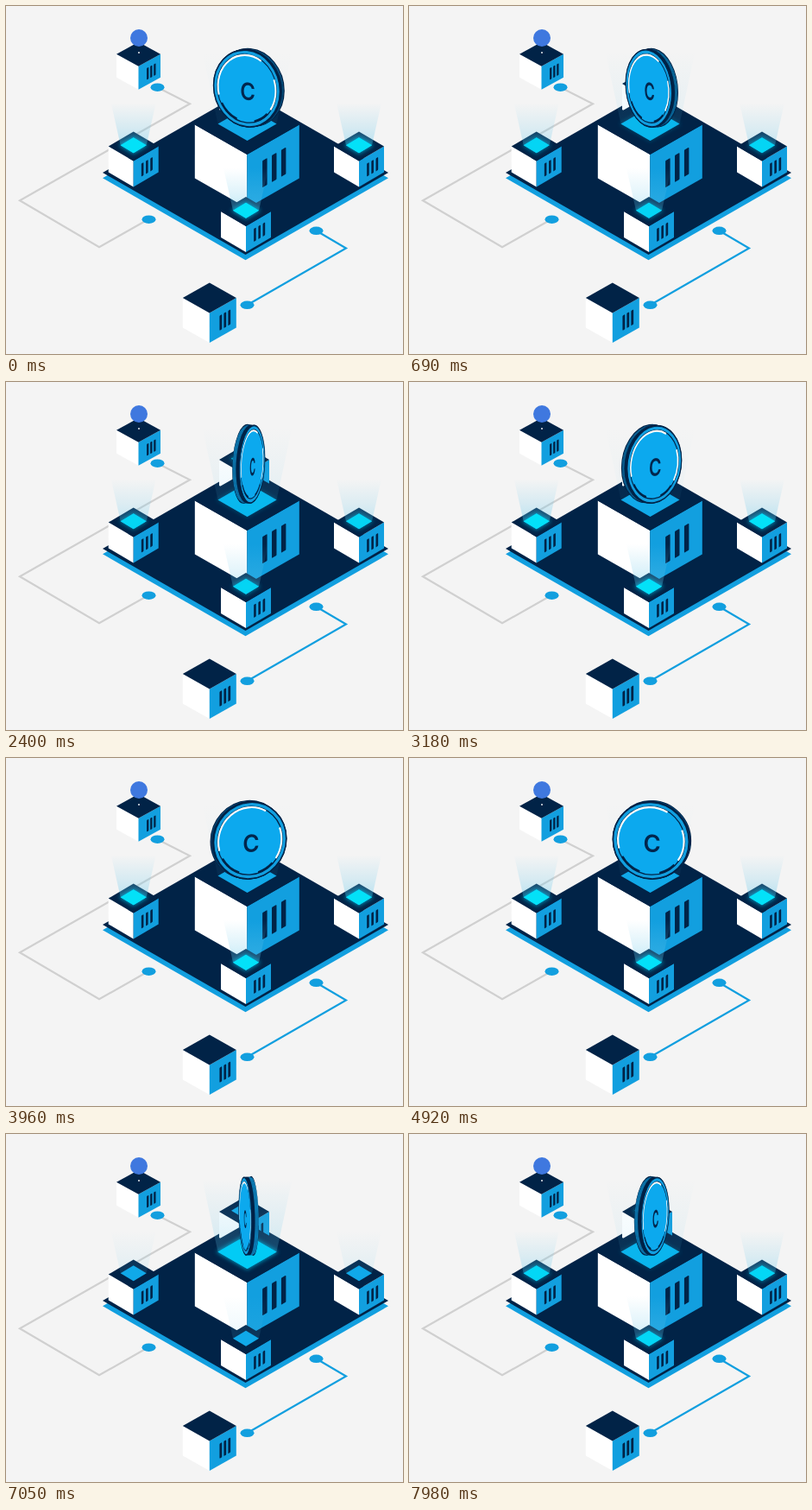
An HTML page for the animation above (8 s loop, 460x403 px).

```html
<!DOCTYPE html>
<html lang="en">
<head>
<meta charset="utf-8">
<title>Coin platform</title>
<style>
html, body { margin: 0; width: 100%; height: 100%; overflow: hidden; background: #f4f4f4; }
svg { display: block; width: 460px; height: 403px; }
text { font: 600 28px Inter, "Open Sans", sans-serif; text-anchor: middle; fill: #02264d; }
</style>
</head>
<body>
<svg id="stage" viewBox="0 0 460 403">
  <defs>
    <linearGradient id="ray" x1="0" y1="0" x2="0" y2="1">
      <stop offset="0" stop-color="#6cc8ea" stop-opacity="0"/>
      <stop offset=".5" stop-color="#6cc8ea" stop-opacity=".22"/>
      <stop offset="1" stop-color="#4fc6ee" stop-opacity=".45"/>
    </linearGradient>
    <filter id="soft" x="-50%" y="-50%" width="200%" height="200%"><feGaussianBlur stdDeviation="2.5"/></filter>
  </defs>
  <g id="scene"></g>
  <g id="coin"></g>
  <g id="front"></g>
</svg>
<script>
const NAVY = '#012347', BLUE = '#129fdf', SKY = '#0ca9ee', PALE = '#d0d0d0';
const LOOP = 8000, STEP = 30;
const START_ANGLE = 31, SPIN = 0.03257;
const PULSE = { period: 5526, from: 200, length: 2700 };
const COIN = { x: 281.2, y: 95, r: 45.2, depth: 8.5, pitch: 9 * Math.PI / 180 };

const byId = id => document.getElementById(id);
let layer = byId('scene');

function add(tag, attrs, parent = layer) {
  const node = document.createElementNS('http://www.w3.org/2000/svg', tag);
  for (const key in attrs) node.setAttribute(key, attrs[key]);
  parent.append(node);
  return node;
}
const poly = (points, fill, extra) => add('polygon', { points: points.join(' '), fill, ...extra });
const diamond = (x, y, w, h, fill, extra) =>
  poly([[x, y - h], [x + w, y], [x, y + h], [x - w, y]], fill, extra);

function route(points, color) {
  add('polyline', { points: points.join(' '), fill: 'none', stroke: color, 'stroke-width': 2.2 });
}
const dot = (cx, cy) => add('ellipse', { cx, cy, rx: 8, ry: 4.8, fill: BLUE });

// (x, y) is the centre of the top face; w and h are its half sizes
function cube(x, y, w, h, tall, firstBar = 0.34, barGap = 0.18) {
  poly([[x - w, y], [x, y + h], [x, y + h + tall], [x - w, y + tall]], '#fff');
  poly([[x + w, y], [x, y + h], [x, y + h + tall], [x + w, y + tall]], BLUE);
  diamond(x, y, w, h, NAVY);
  const side = add('g', { transform: `matrix(1 ${-h / w} 0 1 ${x} ${y + h})` });
  for (let i = 0; i < 3; i++) {
    add('rect', {
      x: w * (firstBar + i * barGap - 0.045), y: tall * 0.28,
      width: w * 0.09, height: tall * 0.5, rx: 0.8, fill: NAVY
    }, side);
  }
}

const sideLights = [], mainLights = [];

function pad(x, y, w, h, glow, lights) {
  diamond(x, y, w, h, '#10a9e9');
  lights.push(
    diamond(x, y, w + 2, h + 1, '#08c8ee', { filter: 'url(#soft)', 'fill-opacity': 0.7 }),
    diamond(x, y, w, h, glow));
}
function beam(x, y, w, h, spread, rise) {
  return poly([[x - w, y], [x - w - spread, y - rise], [x + w + spread, y - rise], [x + w, y], [x, y + h]],
    'url(#ray)');
}

const sideBeams = [];
function station(x, y, lit = true) {
  cube(x, y, 29, 17, 30, 0.36);
  if (lit) sideBeams.push(beam(x, y - 1.2, 15, 9, 11, 49));
  pad(x, y - 1.2, 15, 9, '#03e1f8', sideLights);
}

route([[175, 94], [213, 113.3], [16, 225.3], [108, 279.3], [165, 247]], PALE);
route([[359.5, 260.3], [394, 280.5], [279.5, 346.3]], BLUE);
dot(175.5, 94.2);
dot(165.5, 247.2);
dot(359.5, 260.3);
dot(279.5, 346.3);

cube(153.5, 55.7, 25.5, 14, 27, 0.42, 0.16);
add('circle', { cx: 154, cy: 37, r: 10, fill: '#3f78df' });
add('circle', { cx: 154, cy: 54, r: 0.9, fill: '#fff' });
cube(235.8, 338, 31, 17.5, 34.5, 0.42, 0.16);

diamond(277.5, 199.3, 165.5, 95, BLUE);
diamond(277.5, 193, 165.5, 95, NAVY);
station(276, 90, false);
cube(279.3, 137.5, 60.5, 34.5, 62);
const mainBeam = beam(279.5, 136.5, 34, 19.5, 18, 84);
pad(279.5, 136.5, 34, 19.5, '#02cbf5', mainLights);

layer = byId('front');
station(147.7, 162.5);
station(409, 162.5);
station(278, 238);

layer = byId('coin');
const disc = (r, fill, stroke, width, parent) =>
  add('circle', { r, fill, stroke, 'stroke-width': width }, parent);
const slices = [];
for (let i = 0; i <= 8; i++) {
  const slice = add('g', {});
  disc(COIN.r, i < 4 ? BLUE : NAVY, NAVY, i ? 0.6 : 1.6, slice);
  slices.push(slice);
}
const face = slices[8];
disc(COIN.r - 0.4, '#119fe0', NAVY, 1.6, face);
disc(40, SKY, NAVY, 1.3, face);
function arc(from, to, stroke, width) {
  const at = deg => [39 * Math.cos(deg * Math.PI / 180), 39 * Math.sin(deg * Math.PI / 180)];
  add('path', { d: `M${at(from)}A39 39 0 0 1 ${at(to)}`, fill: 'none', stroke, 'stroke-width': width }, face);
}
arc(165, 300, '#fff', 2.2);
arc(-20, 35, '#fff', 2.2);
arc(45, 75, NAVY, 2.4);
arc(110, 150, NAVY, 2.4);
add('text', { x: 1.3, y: 13.4 }, face).textContent = 'C';

function poseCoin(degrees) {
  // both sides look alike, so the visible one always lies within a quarter turn
  const turn = ((degrees + 90) % 180 - 90) * Math.PI / 180;
  const c = Math.cos(turn), s = Math.sin(turn);
  const up = Math.cos(COIN.pitch), lean = Math.sin(COIN.pitch);
  slices.forEach((slice, i) => {
    const d = COIN.depth * (i / 8 - 0.5);
    slice.setAttribute('transform',
      `matrix(${c} ${s * lean} 0 ${up} ${COIN.x - s * d} ${COIN.y + c * lean * d})`);
  });
}

function draw(now) {
  const t = Math.floor(now % LOOP / STEP) * STEP;
  poseCoin(START_ANGLE + SPIN * t);
  const u = (t % PULSE.period - PULSE.from) / PULSE.length;
  const pulse = u > 0 && u < 1 ? Math.sin(Math.PI * u) ** 2 : 0;
  const fade = (nodes, value) => nodes.forEach(node => node.setAttribute('opacity', value));
  fade(sideLights, 1 - pulse);
  fade(sideBeams, 1 - 0.65 * pulse);
  fade(mainLights, pulse);
  fade([mainBeam], 0.15 + 0.55 * pulse);
}

const begin = performance.now();
function tick() {
  draw(performance.now() - begin);
  requestAnimationFrame(tick);
}
tick();
</script>
</body>
</html>
```
